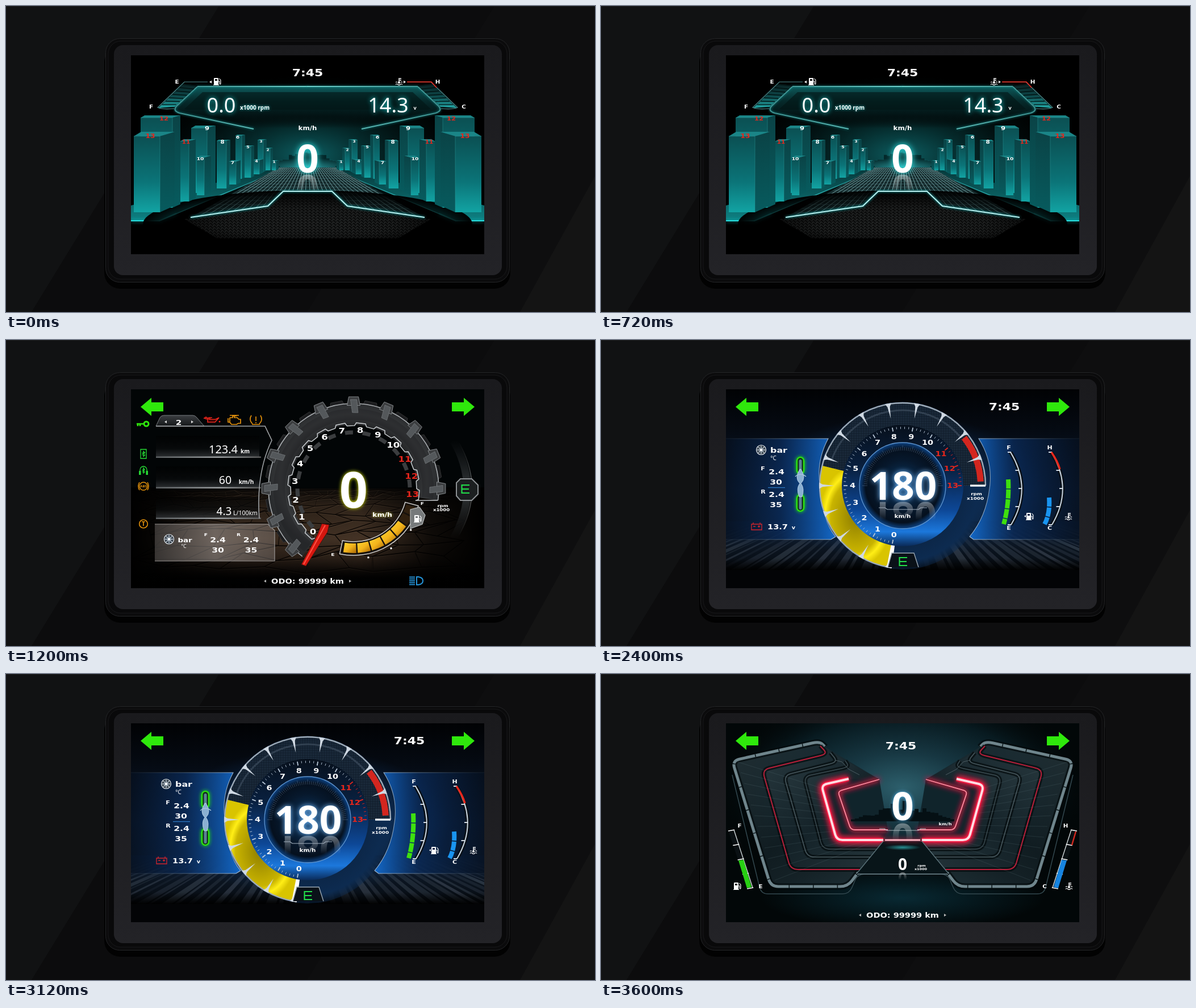
Recreate the animation shown at these times as an HTML page. Size 1037x540 px, loop 4800 ms.

```html
<!DOCTYPE html>
<html lang="en">
<head>
<meta charset="utf-8">
<title>Dashboard themes</title>
<style>
html,body{margin:0;width:100%;height:100%;overflow:hidden;background:#0e0e0f}
svg{display:block;width:100%;height:100%}
text{text-anchor:middle}
.wide{font-family:"DejaVu Sans",sans-serif;font-weight:700}
.sans{font-family:"Noto Sans","Open Sans",sans-serif}
</style>
</head>
<body>
<svg id="stage" viewBox="0 0 1037 540"></svg>
<script>
const HOLD = 1200, WIDE = 1.22, GREEN = '#2fe80c', LAMP = '#27dd35', RED = '#e8261c', AMBER = '#e8940c', BLUE = '#2596dc';

// ---- helpers
const range = n => [...Array(n).keys()];
const each = (n, f) => range(n).map(f).join('');
const random = seed => () => (seed = seed * 16807 % 2147483647) / 2147483647;
const shape = (d, fill, more = '') => `<path d="${d}" fill="${fill}" ${more}/>`;
const line = (d, color, w = 1, more = '') => shape(d, 'none', `stroke="${color}" stroke-width="${w}" ${more}`);
const edged = (d, fill, color, w = 1) => shape(d, fill, `stroke="${color}" stroke-width="${w}"`);
const rect = (x, y, w, h, fill, more = '') => `<rect x="${x}" y="${y}" width="${w}" height="${h}" fill="${fill}" ${more}/>`;
const full = (y, h, fill) => rect(220, y, 622, h, fill);
const oval = (x, y, rx, ry, fill, more = '') => `<ellipse cx="${x}" cy="${y}" rx="${rx}" ry="${ry}" fill="${fill}" ${more}/>`;
const disc = (x, y, r, fill, color = 'none', w = 1) => oval(x, y, r, r, fill, `stroke="${color}" stroke-width="${w}"`);
const group = (s, more) => `<g ${more}>${s}</g>`;
const place = (x, y, s) => group(s, `transform="translate(${x} ${y})"`);
const both = s => s + group(s, 'transform="matrix(-1 0 0 1 1062 0)"');
const glow = (c, r = 4) => `style="filter:drop-shadow(0 0 ${r}px ${c})"`;
const wide = (x, y, size, s, fill = '#fff') =>
  `<text class="wide" transform="translate(${x} ${y + size * .365}) scale(${WIDE} 1)" font-size="${size}" fill="${fill}">${s}</text>`;
const labels = (size, list) => list.split(' ').map(s => s.split(',')).map(([s, x, y]) => wide(x, +y, size, s)).join('');
const sans = (x, y, size, s, weight = 400, more = 'fill="#fff"') =>
  `<text class="sans" x="${x}" y="${y + size * .357}" font-size="${size}" font-weight="${weight}" ${more}>${s}</text>`;
const lit = (c, r) => 'fill="#fff" ' + glow(c, r);
const reflection = (x, base, size, s) => group(sans(0, -size * .357, size, s, 800, 'fill="url(#fade)"'), `transform="translate(${x} ${base}) scale(1 -1)"`);

const dial = (cx, cy) => {
  const at = (r, deg) => {
    const a = deg * Math.PI / 180;
    return [(cx + r * Math.cos(a)).toFixed(1), (cy + r * Math.sin(a)).toFixed(1)];
  };
  const sweep = (r, a, b) => `A${r},${r} 0 ${+(Math.abs(b - a) > 180)} ${+(b > a)} ${at(r, b)}`;
  const arc = (r, a, b) => `M${at(r, a)}${sweep(r, a, b)}`;
  return {
    at, arc,
    band: (r, R, a, b) => `${arc(R, a, b)}L${at(r, b)}${sweep(r, b, a)}Z`,
    ray: (r, R, a) => `M${at(r, a)}L${at(R, a)}`
  };
};
// Polyline with rounded corners.
const bend = (text, r) => {
  const p = text.split(' ').map(s => s.split(',').map(Number));
  const toward = (a, b) => {
    const k = Math.min(.5, r / Math.hypot(b[0] - a[0], b[1] - a[1]));
    return a.map((v, i) => v + (b[i] - v) * k);
  };
  return 'M' + p[0] + p.slice(1, -1).map((q, i) => `L${toward(q, p[i])}Q${q} ${toward(q, p[i + 2])}`).join('') + 'L' + p[p.length - 1];
};

// ---- shared parts
const fuel = (x, y) => place(x, y,
  shape('M-5,6V-5Q-5,-6 -4,-6H2Q3,-6 3,-5V6ZM-3,-4V-1H1V-4Z', '#fff', 'fill-rule="evenodd"') +
  line('M-6,6.5H4M3,0H5V4Q6.5,6 7,4V-2L4.5,-5', '#fff', 1.1));
const temp = (x, y) => place(x, y, line('M0,-6V2M1,-5H4M1,-2H4', '#fff', 1.5) + disc(0, 2, 2, '#fff') +
  line('M-6,2Q-4.5,0 -3,2M3,2Q4.5,0 6,2M-6,5.5Q-4,3.5 -2,5.5T2,5.5T6,5.5', '#fff', 1.1));
const wheel = (x, y) => disc(x, y, 8.5, '#38424c', '#e8edf2', 1.2) +
  each(8, i => line(dial(x, y).ray(0, 7, i * 45), '#d6e2ee', 1.3)) + disc(x, y, 2, '#fff');
const signals = both(shape('M237,118L256,102V110H277V126H256V134Z', GREEN));
const odometer = wide(531, 425.5, 11.9, 'ODO: 99999 km') + both(shape('M454,425.5L458,423V428Z', '#b8b8b8'));
const modeE = (x, y) => place(x, y, line('M7,-7H-6.5V7H7M-6,0H6', '#22e04a', 2.1));
const skyline = (x, y, w, n, low, high, fill, seed) => {
  const rnd = random(seed);
  return shape(`M${x},${y}` + each(n, i => {
    const mid = 1 - Math.abs((i + .5) / n * 2 - 1);
    return `V${(y - low - (high - low) * mid * (.4 + .6 * rnd())).toFixed(1)}h${w / n}`;
  }) + `V${y}Z`, fill);
};

const device = () => rect(0, 0, 1037, 540, '#0e0e0f') +
  shape('M0,0H375L45,540H0Z', '#111213') + shape('M375,0H860L530,540H45Z', '#0c0c0d') +
  shape('M1037,300V540H905Z', '#141414') + rect(0, 0, 1037, 1, '#1d1e20') +
  rect(173, 72, 715, 427, '#020202', 'rx="28"') +
  rect(175.5, 57.5, 711, 430, '#0b0b0c', 'rx="25" stroke="#242527"') +
  rect(180, 62, 702, 420, '#09090a', 'rx="22" stroke="#19191b"') +
  rect(190, 69, 683, 406, 'url(#bezel)', 'rx="16"') + full(87, 351, '#000');

// ---- teal city
const ROAD = 'M480,285H582L737,373L601,353L574,327H488L461,353L325,373Z';
// value, left, edge, right, top, bottom, label x, label y, label size
const towers = [
  [3, 443, 453, 459, 235, 293, 449, 239, 6], [2, 457, 465, 470, 250, 290, 461, 254, 6],
  [1, 468, 475, 480, 272, 290, 472, 275, 6], [6, 404, 415, 421, 227, 305, 408, 231, 7.5],
  [5, 420, 431, 437, 246, 303, 426, 249, 6.5], [4, 436, 446, 453, 270, 297, 441, 274, 6.5],
  [9, 326, 354, 369, 211, 330, 354, 216, 9.5], [8, 371, 388, 395, 236, 322, 381, 240, 8.5],
  [7, 393, 405, 413, 272, 315, 399, 276, 7.5], [12, 237, 293, 307, 193, 356, 278, 198.5, 9.5],
  [11, 307, 322, 334, 235, 345, 317, 240, 8.5], [10, 336, 349, 361, 264, 334, 342, 269, 7.5],
  [13, 225, 271, 297, 222, 364, 254, 229, 10]
];
function tower([, l, e, r, t, b]) {
  const eave = t + (r - e) * .3, side = b - (r - e) * .45;
  return shape(`M${e},${eave}L${r},${t}V${side}L${e},${b}Z`, 'url(#towerSide)') +
    shape(`M${l},${eave}H${e}V${b}H${l}Z`, 'url(#tower)') +
    shape(`M${l},${eave}L${l + (r - e) / 2},${t}H${r}L${e},${eave}Z`, '#1a8587') +
    line(`M${l},${eave}H${e}V${b}`, '#33a7a7', .6, 'opacity=".7"');
}
function city() {
  const ground = shape('M220,379H270L482,290V282L220,352Z', 'url(#pave)') +
    line('M270,379L482,290', 'url(#kerb)', 1.6) + line('M220,379H270L300,366', '#29dede', 2, glow('#0cc', 3));
  const grid = each(34, i => line(`M531,256L${322 + i * 12.7},374`, '#7fb0b2', .9)) +
    each(17, i => line(`M320,${284 + 3.4 * i + i * i * .13}H742`, '#4b7d80', .5));
  const visor = shape('M337,142H531V216H435L306,189Q293,185 300,177Z', 'url(#visor)') +
    shape('M346,152H531V183H320L314,182Z', '#031414', 'opacity=".6"') +
    line('M436,217L306,189Q293,185 300,177L337,142H532', 'url(#visorEdge)', 2.2, glow('#0a8a8a', 2)) +
    shape('M312,137L338,140L297,178L268,180Z', 'url(#sideGauge)') +
    each(7, i => line(`M${312 - i * 6.2},${138 + i * 6}l25,${3 - i * .5}`, '#021111', 1.3)) +
    line('M355,134H314L267,179Q275,183 296,181', '#4f8f91', 1.2);
  const numbers = towers.map(t => [t[6], 1062 - t[6]].map(x => wide(x, t[7], t[8], t[0], t[0] > 10 ? RED : '#fff')).join('')).join('');
  return oval(531, 262, 290, 140, 'url(#tealHaze)') +
    skyline(476, 288, 110, 20, 12, 44, '#04282a', 11) + oval(531, 286, 85, 18, 'url(#tealGlow)') +
    both(ground) + group(shape(ROAD, '#14282a') + grid, 'clip-path="url(#road)"') +
    shape('M488,329H574L601,355L748,376L690,410H372L314,376L461,355Z', 'url(#mesh)') +
    oval(531, 385, 290, 60, 'url(#meshShade)') + full(400, 38, 'url(#bottomFade)') +
    line('M325,373L461,353L488,327H574L601,353L737,373', '#b9f0f0', 2, glow('#1cc', 2)) +
    both(visor) + line('M706,134H749L758,144', '#f0281e', 1.6) + both(towers.map(tower).join('')) + numbers +
    wide(531, 117, 18, '7:45') + labels(8.5, 'E,301,133.5 F,255.5,177.5 H,760,133.5 C,806,177.5') +
    fuel(371, 133) + temp(692, 133) + shape('M358,134L362,131.5V136.5ZM704,134L700,131.5V136.5Z', '#fff') +
    sans(379, 175, 36, '0.0', 500, lit('#1dd')) + sans(673, 175, 36, '14.3', 500, lit('#1dd')) +
    sans(438, 179, 10, 'x1000 rpm', 700, lit('#1bb', 2)) + sans(720, 180, 9, 'v', 700) +
    wide(531, 215.5, 9.7, 'km/h') + sans(531, 269, 69, '0', 800, lit('#3ee', 6)) + reflection(531, 298, 69, '0');
}

// ---- off-road
function cracks() {
  const rnd = random(77), gap = r => 18 + r * 5;
  const rows = range(10).map(r => range(Math.ceil(560 / gap(r))).map(i => [
    (240 + (i + r % 2 / 2 + (rnd() - .5) * .7) * gap(r)).toFixed(1),
    (266 + r * 6 + r * r * 1.05 + (rnd() - .5) * (5 + r * 1.5)).toFixed(1)
  ]));
  return rows.map((row, r) => {
    const below = rows[r + 1] || row;
    const d = 'M' + row.join('L') + row.map((q, i) => `M${q}L${below[Math.floor(i * below.length / row.length)]}`).join('');
    return line(d, '#0d0805', .7 + r * .16) + line(d, '#a08468', .4, 'transform="translate(0 1.4)" opacity=".45"');
  }).join('');
}
function warnings() {
  return place(362, 141, edged('M-13,-3L-7,-1V4H6L13,-4L7,-1H-4L-10,-5ZM-3,-1V-4H-6M-4,-4H1', '#3a0505', RED, 1.6) + disc(14, 3, 1.5, RED)) +
    place(402, 141, line('M-8,-4H-3V-7H4M0,-7V-4H5L8,-1H11V6H7L4,8H-5L-8,4H-11V-3M-8,-4V4M-8,-8H8', AMBER, 1.7)) +
    place(440, 141, line('M-6,7Q-13,0 -8,-8M6,7Q13,0 8,-8M-7,8H7M0,-6V2M0,4V6', AMBER, 1.6)) +
    place(241, 148, disc(6, 0, 4, 'none', GREEN, 3) + line('M2,0H-11M-5,0V4M-9,0V4', GREEN, 2.6)) +
    place(242, 201, line('M-5,-8H5V8H-5ZM-2.5,-2L2.5,2L0,4.5V-4.5L2.5,-2L-2.5,2', LAMP, 1.3)) +
    place(242, 230, line('M-6,1V-1A6,6 0 0 1 6,-1V1M-2,-1L2,3L0,5V-4L2,-1L-2,3', LAMP, 1.3) + line('M-6.2,1V8M6.2,1V8', LAMP, 3.4)) +
    place(242, 258, disc(0, 0, 7, 'none', AMBER, 1.4) + line('M-7,-7Q-11,0 -7,7M7,-7Q11,0 7,7', AMBER, 1.5)) +
    sans(242, 258, 6, 'ABS', 800, `fill="${AMBER}"`) +
    disc(242, 324.5, 7.3, 'none', AMBER, 1.6) + sans(242, 324.5, 11, 'T', 800, `fill="${AMBER}"`) +
    place(722, 425, line('M1,-7H4Q12,-6 12,0T4,7H1Z', BLUE, 2) + each(5, i => line(`M-12,${i * 3.3 - 6.6}H-2`, BLUE, 1.8)));
}
function offroad() {
  const { at, arc, band, ray } = dial(612, 262), first = 133.4, step = 17.87;
  const lug = (a, R, w, fill, color) =>
    edged(`M${at(147, a - w - 1.5)}L${at(R, a - w)}L${at(R, a + w)}L${at(147, a + w + 1.5)}Z`, fill, color);
  const tread = a => lug(a, 162, 3, '#3c3e40', '#85898c') +
    edged(`M${at(157, a - 2)}L${at(157, a + 2)}L${at(134, a + 3.4)}L${at(134, a - 1)}Z`, '#54585b', '#797d80', .7);
  const outline = 'M' + range(14).map(i =>
    [[-5.5, 111], [-4, 116], [4, 116], [5.5, 111]].map(([d, r]) => at(r, first + i * step + d)).join('L')).join('L');
  const tyre = each(10, i => lug(146.25 + i * 22.5, 156, 3.8, '#1c1d1f', '#333')) +
    shape(band(112, 150, 127, 368), 'url(#rubber)') + line(arc(131, 128, 367), '#1d1e20', 20, 'opacity=".35"') +
    line(arc(150, 127, 368), '#a9adb0', 1.6) + each(11, i => tread(135 + i * 22.5)) +
    line(arc(99, 136, 360), '#3b3d3f', 7, 'stroke-dasharray="14 16.9"') +
    line(outline, '#c3c7ca', 1.6) + line(`M${at(150, 368)}L${at(111, 371)}`, '#b5b8ba', 1.6);
  const meter = edged(band(94, 118, 15, 102), '#17120d', '#d0d0d0', 1.5) +
    each(5, i => shape(band(97, 114, 36 + i * 12.9, 47.6 + i * 12.9), 'url(#gold)')) +
    each(2, i => shape(band(97, 114, 17 + i * 9.5, 25 + i * 9.5), '#30200f')) +
    [36, 58, 78].map(a => line(ray(123, 126, a), '#fff', 3)).join('') +
    edged('M712,299L728,295L738,309L733,325L712,333Z', '#777a7b', '#b9bcbd', 1.2) + fuel(724, 315);
  const row = y => rect(264, y - 38, 182, 38, 'url(#rowShade)') + rect(264, y - 1.5, 185, 2.5, 'url(#rowLine)');
  const panel = edged('M264,152L271,137Q273,133 278,133H329Q333,133 336,137L349,152Z', 'url(#tab)', '#777b7e') +
    [207, 261, 315].map(row).join('') + line('M264,152H456L468,177Q440,235 446,315', '#a1a5a8', 1.6) +
    edged('M262,325H461L473,336V390H262', 'url(#tyrePanel)', '#999593', 1.2);
  const mode = line('M788,178Q836,263 788,350', 'url(#modeArc)', 13) + line('M797,180Q844,263 797,346', 'url(#modeEdge)', 1.3) +
    edged('M800,245H820L831,256V272L820,283H800L793,275V252Z', '#1c1f20', '#8d9194', 2) + modeE(809, 263);
  return full(87, 351, '#020506') + full(262, 160, 'url(#soil)') + cracks() + full(260, 178, 'url(#soilSides)') +
    full(385, 53, 'url(#bottomFade)') + panel + mode + tyre + meter +
    each(14, i => wide(...at(104, first + i * step).map(Number), 13.6, i, i > 10 ? RED : '#fff')) +
    edged('M556,324L569,326L566,339L528,399L520,396L549,342Z', '#d5170f', '#48110d') + line('M562,327L524,396', '#ff5145', 2) +
    signals + warnings() + wide(304, 145, 12.5, '2') + shape('M279,144.5L283,142V147ZM330,144.5L326,142V147Z', '#ddd') +
    sans(382.5, 193, 20, '123.4') + sans(421, 196.5, 10, 'km', 600) + sans(386, 247, 19.5, '60') + sans(423, 250.5, 10, 'km/h', 600) +
    sans(384, 302, 19, '4.3') + sans(421.5, 305, 10.5, 'L/100km', 500) +
    wheel(287, 351.5) + wide(315, 352.5, 11, 'bar') + sans(313, 364, 9, '°C') +
    labels(7.5, 'F,352,343.5 R,409.5,343.5 E,575.5,378 F,733,288') + labels(12.8, '2.4,373,352 30,373,370 2.4,431.5,352 35,431.5,370') +
    labels(7, 'rpm,769,292.5 x1000,766.5,299.5') + sans(612, 265, 87, '0', 800, lit('#e2f000', 3)) +
    group(wide(662.5, 308, 10.3, 'km/h'), glow('#c8c840', 2)) + odometer;
}

// ---- blue sport
function sport() {
  const { at, arc, band, ray } = dial(531, 257), rnd = random(5);
  const streaks = each(46, i => shape(`M531,235L${20 + i * 23},406h${4 + rnd() * 15}Z`, '#8b9aad', `opacity="${.06 + rnd() * .2}"`));
  const left = 'M220,174H400Q378,215 386,260Q390,320 413,347L405,352H220', right = 'M842,174H665Q691,215 684,262Q678,312 649,347L656,352H842';
  const spike = a => shape(`M${at(147, a - 2.2)}L${at(141, a - .9)}L${at(120, a)}L${at(141, a + .9)}L${at(147, a + 2.2)}Z`, '#cfd8e2');
  const gauge = disc(531, 257, 148, 'url(#blueHalo)') + shape(band(103, 146, 194, 360), 'url(#dots)') +
    shape(band(103, 146, 100, 194), 'url(#yellow)') + shape(band(132, 143, 322, 357), '#d3261f') +
    line(arc(146, 100, 360), '#9eabb8', 2.4) + line(arc(133, 200, 320), '#3d4c5d', 3, 'opacity=".7"') +
    each(13, i => spike(100 + i * 20)) + line(ray(119, 146, 0), '#eef3f8', 3.5) +
    shape(band(98, 147, 97.5, 101), '#fff') + disc(531, 257, 107, 'url(#innerDial)') +
    each(66, i => line(ray(i % 5 ? 100 : 97, 104, 100 + i * 4), i > 54 ? RED : '#b9c8d8', i % 5 ? .9 : 1.8)) +
    disc(531, 257, 76, 'url(#core)', '#5e93cc', 1.3) +
    each(61, i => line(ray(62, i % 5 ? 68 : 71, 180 + i * 3), '#6f8aa8', .7, 'opacity=".6"'));
  const rail = (x, color, from) => {
    const d = `M${x},198Q${x + 39},262 ${x + 1},326`;
    return line(d, '#071018', 7) + line(d, '#c9d3dd', 2) +
      each(5, i => line(`M${x - 5 + 19 * Math.sin(i * Math.PI / 4)},${198 + i * 32}h6`, '#e6edf4', 1.8)) +
      line(`M${x - 4},${from}Q${x - 2},${from / 2 + 167} ${x - 12},325`, color, 8, 'stroke-dasharray="16 1.5"');
  };
  const bike = [222, 288].map(y => rect(345, y - 15, 12, 29, '#12351c', `rx="6" stroke="${GREEN}" stroke-width="2.2" ${glow('#2f0', 3)}`) +
      rect(348.5, y - 11, 5, 22, '#5c7f96', 'rx="2.5"')).join('') +
    edged('M350,228Q340,244 350,253Q343,262 349,277H354Q359,262 352,253Q362,244 352,228Z', '#8ab0d2', '#d0e2f2', .7) + line('M342,241Q351,233 361,241', '#a8c3da', 1.6);
  return full(87, 351, 'url(#night)') + oval(531, 262, 250, 130, 'url(#navy)') +
    group(streaks, 'clip-path="url(#floor)"') + full(320, 45, 'url(#floorFade)') +
    full(385, 22, 'url(#bottomFade)') + full(406, 32, '#030406') +
    edged(left, 'url(#panelLeft)', 'url(#edgeLeft)', 1.1) + edged(right, 'url(#panelRight)', 'url(#edgeRight)', 1.1) +
    gauge + edged('M505,401L512,376H551L559,401', '#0a1118', '#99a6b3', 1.4) + modeE(532, 391) +
    each(14, i => wide(...at(88, 100 + i * 20).map(Number), 11.8, i, i > 10 ? RED : '#fff')) +
    reflection(532, 286, 69, '180') + sans(532, 257, 69, '180', 800, lit('#7bc0ff', 5)) +
    line('M489,296H500L504,299H559L563,296H574', '#a6b4c2', 1.1) + wide(531, 310.5, 8.5, 'km/h') +
    labels(7.2, 'rpm,661,271 x1000,659,279.5') + wide(710, 117.5, 18, '7:45') + signals +
    wheel(282, 194) + wide(313, 194.5, 13, 'bar') + sans(303.5, 208, 10, '°C') +
    labels(9, 'F,285,226.5 R,285.5,267.5 F,718,190 H,790,190 E,718,332 C,790,332') +
    labels(12.8, '2.4,309,232 30,308,250 2.4,309,272.5 35,308,290') + line('M294,260.5H324', '#2d78c4', 1.3) + bike +
    line('M265,325H283V335H265ZM268,325V322M280,325V322M268,329H272M276,329H280M278,327V331', '#d3252c', 1.3) +
    wide(311, 330, 12, '13.7') + wide(339, 331, 8, 'v') +
    rail(721, '#3ee00f', 246) + rail(793, '#1994f0', 278) + line('M793,198Q804,214 808,228', RED, 3.5) +
    fuel(754, 311) + shape('M745,311L748,309V313Z', '#fff') + temp(823, 311);
}

// ---- red neon
function neon() {
  const shells = [
    ['395,129 385,119 231,153 299,375 434,375 453,350', '#6f858c', 5],
    ['386,127 399,141 284,169 334,345 456,345', '#b91f3a', 2],
    ['404,139 417,155 322,179 363,323 478,323', '#48585e', 1.6],
    ['430,153 437,164 357,181 390,309 488,309', '#3c4c52', 1.4]
  ];
  const shell = ([points, color, w]) => {
    const d = bend(points, 13);
    return shape(d + 'L500,294L490,186Z', 'url(#shell)') + line(d, '#02080a', w + 6, 'opacity=".65"') + line(d, color, w);
  };
  const rays = each(12, i => line(`M480,${230 + i * 6}L${240 + i * 6},${155 + i * 19}`, '#6e8990', .6, 'opacity=".3"'));
  const outer = bend('436,185 388,196 415,293 497,293', 10), inner = bend('490,186 417,207 440,275 505,275', 7);
  const wing = shells.map(shell).join('') + rays +
    line(bend(shells[0][0], 13), '#0b1518', 6, 'stroke-dasharray="1.5 41"') +
    line(bend('231,178 282,388 437,388 452,353 531,353', 12), '#33484f', 1.5) +
    line('M412,152L424,155L436,168L455,178', '#4b5b61') + shape(outer + 'L505,275L490,186Z', '#10242b') +
    line(outer, '#ff1440', 13, 'filter="url(#blur)"') + line(outer, '#f01c42', 8) + line(outer, '#ffdce2', 4) +
    line(inner, '#f01840', 6, 'filter="url(#blur)"') + line(inner, '#ff8c9f', 1.8);
  const slant = shape('M224,276H234L268,378H258Z', '#0a1013') + line('M234,275L267,377', '#dde4e6', 1.3) +
    each(5, i => line(`M${224 + i * 8.3},${277 + i * 25.5}l11,-2`, '#fff', 1.6));
  const level = (x, dir, color) => shape(`M${x},329l${9 * dir},-1l${14 * dir},48l${-8 * dir},2Z`, color);
  return full(87, 351, '#020708') + oval(531, 200, 330, 175, 'url(#slate)') + oval(531, 395, 250, 55, 'url(#slateLow)') +
    both(wing) + skyline(440, 260, 182, 26, 3, 42, '#051014', 23) +
    shape('M497,296H565L612,353H450Z', '#081519') + both(line('M497,295L452,350', '#5b737a', 1.3)) + line('M452,353H610', '#6f858c', 1.5) +
    oval(531, 306, 32, 5, 'url(#tealGlow)') + line('M500,293H562', '#ffb3c0', 3, glow('#ff1440')) +
    reflection(531, 264, 69, '0') + line('M490,273H499L503,276H559L563,273H572', '#a8b9be', 1.2) +
    sans(531, 233, 69, '0', 800, lit('#4fb0e8', 3)) + wide(606, 265, 6.8, 'km/h') +
    reflection(531, 350, 28, '0') + sans(531, 336, 28, '0', 800) + labels(5.3, 'rpm,564.5,338 x1000,563,344') +
    wide(528, 126, 18, '7:45') + both(slant) + level(242, 1, '#28cf13') + level(820, -1, '#1684e0') + line('M836,278L829,302', '#d2291f', 2.5) +
    labels(8.5, 'F,244,268 E,281,375 H,818,268 C,781,375') + fuel(239, 374) + temp(824, 374) + signals + odometer;
}

// ---- paint: each stop is offset#color/alpha
const stops = s => s.split(' ').map(t => {
  const [offset, paint] = t.split('#'), [color, alpha = 1] = paint.split('/');
  return `<stop offset="${offset}" stop-color="#${color}" stop-opacity="${alpha}"/>`;
}).join('');
const linear = (x2, y2, list) => Object.entries(list).map(([id, s]) => `<linearGradient id="${id}" x2="${x2}" y2="${y2}">${stops(s)}</linearGradient>`).join('');
const radial = list => Object.entries(list).map(([id, s]) => `<radialGradient id="${id}">${stops(s)}</radialGradient>`).join('');
const pattern = (id, w, h, s) => `<pattern id="${id}" width="${w}" height="${h}" patternUnits="userSpaceOnUse">${s}</pattern>`;
const clip = (id, s) => `<clipPath id="${id}">${s}</clipPath>`;
const defs = linear(0, 1, {
  bezel: '0#1a1a1d 1#232327', fade: '.45#fff/0 .8#fff/.4', bottomFade: '0#000/0 1#000',
  tower: '0#0b5053 .6#0b7478 1#12a3a3', towerSide: '0#0a4346 1#075b5e', pave: '0#063436 1#0e8284',
  visor: '0#0e5a5b .35#062a2b .7#031314 1#000/0', sideGauge: '0#0a1f20 .5#0d4648 1#22a5a4',
  soil: '0#0c0a08 .2#35281d .55#4b3829 .85#251b14 1#030202', rowShade: '0#000/.5 .6#0a0c0d/.7 1#3a3d40/.75', tab: '0#3a3d40 1#15181a',
  modeArc: '0#282b2d/0 .5#34383a 1#282b2d/0', modeEdge: '0#666/0 .5#8a8e90 1#666/0',
  night: '0#010204 .2#050a12 .5#0a1a30 .75#0d1826 1#020304', floorFade: '0#0b1c34 1#0b1c34/0',
  innerDial: '0#07101c .35#09203f .7#0d4796 .88#1c78dc 1#0a2a58'
}) + linear(1, 0, {
  kerb: '0#35f0f0 1#1a6a6c', visorEdge: '0#3d8f8e 1#6fd2cc', soilSides: '0#000 .07#000/.9 .3#000/.25 .65#000/.1 .85#000/.8 1#000',
  rowLine: '0#5a5e60 .6#9a9ea0 1#555', tyrePanel: '0#a29a96/.32 .5#b3aaa5/.5 1#8d8480/.4',
  panelLeft: '0#06101f/.7 .5#0a2a58/.8 1#1368c8', panelRight: '0#1368c8 .4#0a2a58/.8 1#06101f/.7',
  edgeLeft: '0#456/.2 1#a8c0d8', edgeRight: '0#a8c0d8 1#456/.2'
}) + linear(1, 1, { gold: '0#ffd632 .5#f3b41c 1#a86505', shell: '0#2b3c42/.75 .5#152329/.75 1#25363c/.8' }) + radial({
  tealHaze: '0#0f6a6e/.9 .35#084446/.65 1#021010/0', tealGlow: '0#35b9bd/.75 1#35b9bd/0', meshShade: '0#000/0 .5#000/.15 1#000',
  rubber: '0#1a1b1c .7#242527 .86#37393b 1#2a2c2e', navy: '0#114a8e/.8 1#114a8e/0', blueHalo: '0#08162a .9#0d2b50 1#0d2b50/.4',
  yellow: '0#8d7c00 .7#c9b400 .85#ffee16 1#d9c400', core: '0#0d3a66 .6#07182c .86#05101e 1#0d4384',
  slate: '0#2d5f6c .35#173742 .7#081a20 1#020708/0', slateLow: '0#0d4050/.6 1#0d4050/0'
}) + pattern('mesh', 7, 5, rect(0, 0, 7, 5, '#0b0c0c') + line('M0,5L3.5,1L7,5M0,2.5L3.5,0', '#303333')) +
  pattern('dots', 3, 3, rect(0, 0, 3, 3, '#101c2a') + disc(1.5, 1.5, .75, '#344b63')) +
  '<filter id="blur" x="-40%" y="-40%" width="180%" height="180%"><feGaussianBlur stdDeviation="5"/></filter>' +
  clip('road', shape(ROAD, '#000')) + clip('screen', full(87, 351, '#000')) + clip('floor', full(320, 86, '#000'));

// ---- playback
const stage = document.getElementById('stage');
stage.innerHTML = `<defs>${defs}</defs>` + device() +
  [city, offroad, sport, neon].map(draw => group(draw(), 'class="theme" clip-path="url(#screen)"')).join('');
const themes = [...stage.querySelectorAll('.theme')];
const start = performance.now();
function tick() {
  const current = Math.floor((performance.now() - start) / HOLD) % themes.length;
  themes.forEach((g, i) => g.setAttribute('display', i === current ? 'inline' : 'none'));
  requestAnimationFrame(tick);
}
tick();
</script>
</body>
</html>
```
